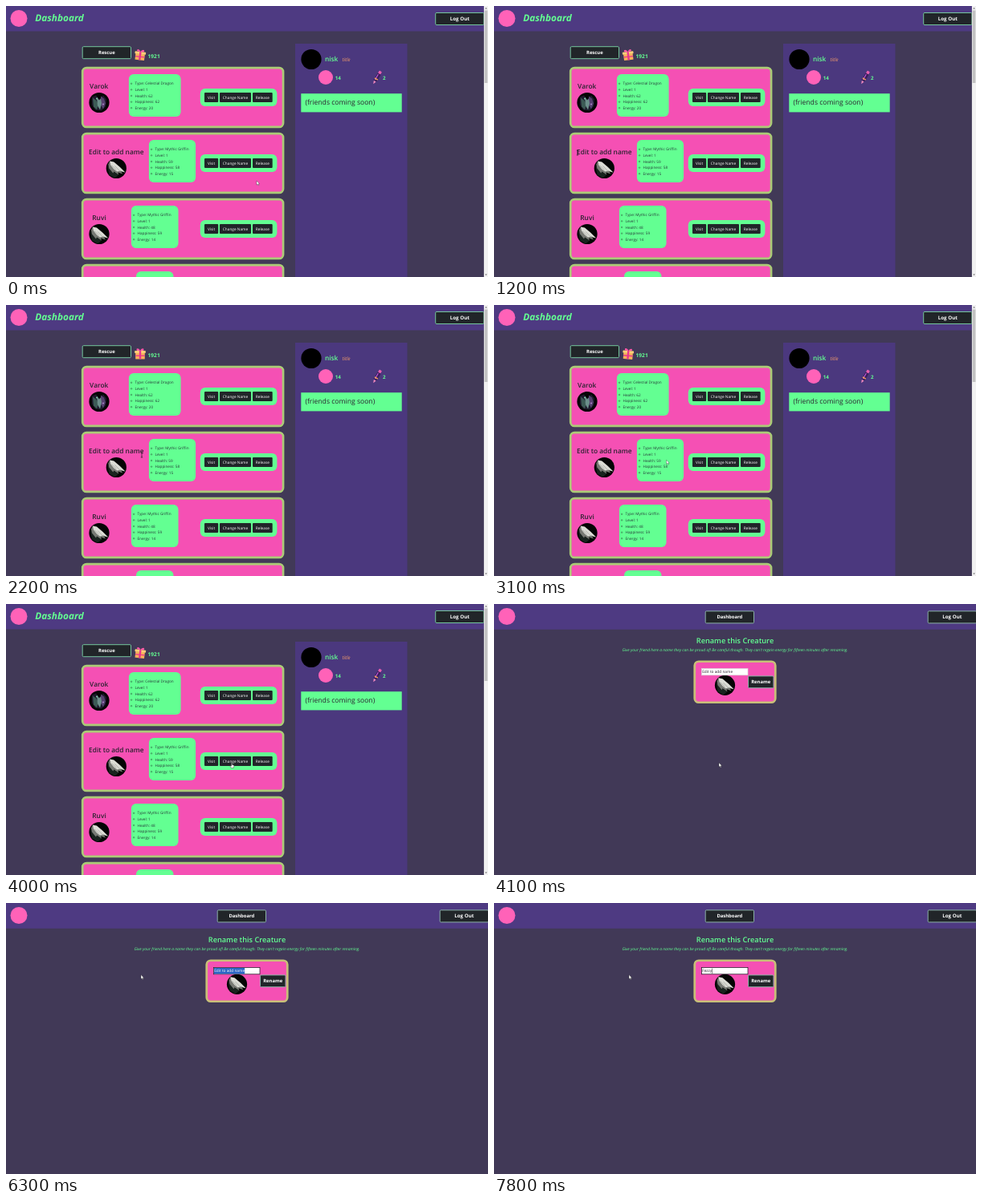
Recreate the animation shown at these times as an HTML page. Size 600 by 338 pixels, loop 8 s.

```html
<!DOCTYPE html>
<html lang="en">
<head>
<meta charset="utf-8">
<title>Creature dashboard</title>
<style>
html, body { margin: 0; width: 100%; height: 100%; overflow: hidden; background: #413957; }
svg { display: block; width: 100vw; height: 100vh; }
text { font-family: "Open Sans", "Noto Sans", sans-serif; text-rendering: geometricPrecision; white-space: pre; }
</style>
</head>
<body>
<svg id="stage" viewBox="0 0 600 338"></svg>
<script>
const LOOP = 8000, SWITCH = 4100;
const GREEN = '#63ff92', PINK = '#f550b4', DARK = '#212529', HEADER = '#4e3a82';
const INK = '#2b2230', LOGO = '#ff62b8', EDGE = '#74c69d', EDGE2 = '#8bb0a6';

const rect = (x, y, w, h, fill, r = 0, more = '') =>
  `<rect x="${x}" y="${y}" width="${w}" height="${h}" rx="${r}" fill="${fill}" ${more}/>`;
const circle = (x, y, r, fill, more = '') =>
  `<circle cx="${x}" cy="${y}" r="${r}" fill="${fill}" ${more}/>`;
const text = (x, y, size, str, fill, more = '') =>
  `<text x="${x}" y="${y}" font-size="${size}" fill="${fill}" ${more}>${str}</text>`;
const path = (d, fill, more = '') => `<path d="${d}" fill="${fill}" ${more}/>`;
const group = (x, y, body, more = '') => `<g transform="translate(${x} ${y})" ${more}>${body}</g>`;
const MID = 'text-anchor="middle"', BOLD = 'font-weight="700"', SEMI = 'font-weight="600"';
const ITALIC = 'font-style="italic"';

const bigButton = (x, y, w, h, label, edge, size = 5.9) =>
  rect(x + .5, y + .5, w - 1, h - 1, DARK, 1.2, `stroke="${edge}"`) +
  text(x + w / 2, y + h / 2 + 2, size, label, '#fff', `${MID} ${BOLD}`);

const smallButton = (x, y, w, label) =>
  rect(x, y, w, 12, DARK, 1) + text(x + w / 2, y + 7.7, 4.75, label, '#fff', MID);

const frame = (x, y, w, h, edge) =>
  rect(x + 1.25, y + 1.25, w - 2.5, h - 2.5, PINK, 5, `stroke="${edge}" stroke-width="2.7"`);

function avatar(x, y, kind) {
  const dragon =
    path('M-9-7L-4-9L0-4L5-9L9-4L8 5L3 10L-5 9L-9 3Z', '#1d1a2c') +
    path('M-8-6L-4-3L-1 2L-3 9L-7 5Z', '#3c5b55') + path('M2-8L6-5L8 1L5 8L2 3Z', '#55406f') +
    path('M-3-7L0-3L2-5L3 1L1 9L-2 4Z', '#6b8f8a') + circle(-3, -5, .9, '#8fe0b8') + circle(5, 2, 1, '#b38ad0');
  const griffin =
    path('M-11-4L-5 3L3 8L-2 12L-9 8Z', '#18231e') +
    path('M-8-9L-2-6L5-1L11 5L6 4L8 7L2 5L3 8L-3 4L-4 6L-9 0L-10-5Z', '#777a74') +
    path('M-8-9L-3-8L4-2L11 5L5 3L1 4L-3 1L-7-4Z', '#dcddd6') +
    path('M-6-4L0 2M-2-3L4 3', 'none', 'stroke="#8d918a" stroke-width=".6"');
  return group(x, y, circle(0, 0, 12.6, '#050505') + (kind === 'dragon' ? dragon : griffin));
}

function card(y, name, nameX, kind, avatarX, boxX, boxW, stats) {
  const lines = stats.map((s, i) =>
    circle(boxX + 3.2, 20.8 + i * 7.6, .8, 'none', 'stroke="#2b5a3e" stroke-width=".5"') +
    text(boxX + 7.6, 22.4 + i * 7.6, 4.68, s, '#27383a')).join('');
  return group(0, y,
    frame(94, -.2, 252.3, 76.4, '#abcb76') +
    text(nameX, 27.2, 8.35, name, INK, `${MID} ${SEMI}`) +
    avatar(avatarX, 44.5, kind) +
    rect(boxX, 9, boxW, 53, GREEN, 6) + lines +
    rect(241.8, 27, 95.6, 22, GREEN, 6) +
    smallButton(247, 32, 17.2, 'Visit') +
    smallButton(266, 32, 39, 'Change Name') +
    smallButton(307, 32, 24.7, 'Release'));
}

const statList = (type, health, joy, energy) =>
  ['Type: ' + type, 'Level: 1', 'Health: ' + health, 'Happiness: ' + joy, 'Energy: ' + energy];

const gift =
  rect(-5.8, -1.5, 11.6, 8, '#f7b05a', .6) + rect(-6.8, -4, 13.6, 3, '#ffcf78', .6) +
  rect(-1.2, -4, 2.4, 10.4, '#e8368f') + rect(-5.8, 1.6, 11.6, 1.3, '#e8368f') +
  path('M0-4C-2-8-6-7-4-4ZM0-4C2-8 6-7 4-4Z', '#ff5aa8');

const pen = `<g transform="rotate(30)">` +
  rect(-2.2, -5.5, 4.4, 11, '#3b1f5c', 1.2) + rect(-1.8, -8.8, 3.6, 3.6, '#e85fb0', .7) +
  rect(-1.3, -4, 1.1, 8, '#c95be0', .4) + rect(-2.2, 1.6, 4.4, 1.4, '#f7a35a') +
  path('M-1.6 5.5H1.6L0 9.5Z', '#f58bc0') + '</g>';

const dashboard =
  rect(0, 0, 600, 31.5, HEADER) + circle(16, 15.5, 10.5, LOGO) +
  text(36.3, 18.9, 11.8, 'Dashboard', GREEN, `${BOLD} ${ITALIC}`) +
  bigButton(534.2, 8, 61.3, 16, 'Log Out', EDGE, 6.2) +
  bigButton(94.7, 50.2, 61.3, 16, 'Rescue', EDGE) +
  group(167, 61, `<g id="gift">${gift}</g>`) +
  text(176.6, 65.3, 6.6, '1921', GREEN, BOLD) +
  card(76, 'Varok', 115.7, 'dragon', 116, 152.9, 64.7, statList('Celestial Dragon', 62, 62, 20)) +
  card(158, 'Edit to add name', 137.3, 'griffin', 137.3, 177.9, 58.2, statList('Mythic Griffin', 59, 58, 15)) +
  card(240, 'Ruvi', 116, 'griffin', 116, 155.9, 58.6, statList('Mythic Griffin', 48, 59, 14)) +
  frame(94, 321.8, 252.3, 76.4, '#abcb76') + rect(162, 331, 46.5, 53, GREEN, 6) +
  rect(360, 47, 139.5, 300, '#4b387e') + circle(380, 66.5, 12.6, '#000') +
  text(397, 69.3, 8.3, 'nisk', GREEN, SEMI) +
  text(418.4, 69, 6.2, 'title', '#f29a6b', ITALIC) +
  circle(398, 89, 9, LOGO) + text(409.8, 91.6, 6.2, '14', GREEN, BOLD) +
  group(462, 89, pen) + text(469, 91.6, 6.2, '2', GREEN, BOLD) +
  rect(367.3, 109.2, 125.4, 23.2, GREEN) + text(372.4, 123.2, 8.6, '(friends coming soon)', INK) +
  rect(594.9, 0, 5.1, 338, '#f1f1f1') + rect(595.7, 5.5, 3.7, 90.5, '#c1c1c1') +
  path('M596.4 3.6L597.6 2L598.8 3.6ZM596.4 334.4L597.6 336L598.8 334.4Z', '#555');

const renamePage =
  rect(0, 0, 600, 31.8, HEADER) + circle(16, 15.5, 10.5, LOGO) +
  bigButton(262.7, 8.4, 61.3, 16, 'Dashboard', EDGE2) +
  bigButton(539.7, 8.4, 61.3, 16, 'Log Out', EDGE2, 6.2) +
  text(300, 49.2, 9.2, 'Rename this Creature', GREEN, `${MID} ${SEMI}`) +
  text(300, 59.4, 4.94, "Give your friend here a name they can be proud of! Be careful though. They can't regain energy for fifteen minutes after renaming.", GREEN, `${MID} ${ITALIC} font-weight="500"`) +
  frame(248.5, 70.5, 103, 53.5, '#c8c078') +
  avatar(287.5, 101.3, 'griffin') +
  bigButton(316, 89.4, 32.5, 15.8, 'Rename', EDGE2) +
  rect(258.5, 80.5, 57.5, 8.3, '#fff', 0, 'id="field" stroke-width=".7"') +
  text(259.2, 86.4, 4.77, '', INK, 'id="value"') +
  rect(259, 81, 0, 7.4, '#2b66c6', 0, 'id="mark"') +
  `<clipPath id="clip">${rect(259, 80, 0, 9, '#000', 0, 'id="clipBox"')}</clipPath>` +
  text(259.2, 86.4, 4.77, 'Edit to add name', '#fff', 'id="marked" clip-path="url(#clip)"') +
  rect(0, 81.6, .5, 6.4, '#111', 0, 'id="caret"');

const pointers = {
  arrow: path('M0 0V5.2L1.2 4.1L2 5.9L2.9 5.5L2.1 3.8H3.7Z', '#fff', 'stroke="#222" stroke-width=".35"'),
  beam: path('M-1.2-3H1.2M0-3V3M-1.2 3H1.2', 'none', 'stroke="#1c1320" stroke-width=".7"'),
  hand: path('M-.5 0Q0-.7.5 0V2L2.4 2.4Q3 2.7 2.8 3.6L2.3 6H-.6L-2 3.7Q-1.8 2.9-.5 3.7Z', '#fff', 'stroke="#222" stroke-width=".4"')
};

const stage = document.getElementById('stage');
stage.innerHTML = rect(0, 0, 600, 338, '#413957') +
  `<g id="dash">${dashboard}</g><g id="rename">${renamePage}</g><g id="pointer">` +
  Object.entries(pointers).map(([k, v]) => `<g id="${k}">${v}</g>`).join('') + '</g>';
const el = id => document.getElementById(id);
const set = (id, name, value) => el(id).setAttribute(name, value);
const show = (id, on) => set(id, 'visibility', on ? 'inherit' : 'hidden');

// time, x, y of the pointer
const route = [
  [0, 312, 218], [900, 112, 186], [1200, 104, 183], [1500, 166, 186], [1800, 101, 185],
  [2200, 169, 187], [2500, 106, 186], [2750, 164, 187], [3600, 301, 204], [3900, 282, 199],
  [4100, 280, 198], [4200, 280, 198], [4400, 278, 198.5], [4500, 278, 198.5],
  [5100, 297, 85], [5350, 297, 85], [6000, 168, 89.6], [LOOP, 168, 89.6]
];

function pointerAt(t) {
  const i = Math.max(1, route.findIndex(p => p[0] >= t));
  const [t0, x0, y0] = route[i - 1], [t1, x1, y1] = route[i];
  const u = (t - t0) / (t1 - t0), s = u * u * (3 - 2 * u);
  return [x0 + (x1 - x0) * s, y0 + (y1 - y0) * s];
}

function pointerKind(x, y, onDash) {
  if (!onDash) return x > 258 && x < 316 && y > 80 && y < 89 ? 'beam' : 'arrow';
  if (y > 190 && y < 202 && x > 266 && x < 305) return 'hand';
  return x > 102 && x < 172 && y > 177 && y < 189 ? 'beam' : 'arrow';
}

const NAME = 'Fezzy';
const keyTimes = [6800, 7000, 7100, 7300, 7400];

function draw(ms) {
  const t = Math.floor(ms % LOOP / 100 + 1e-6) * 100;
  const onDash = t < SWITCH;
  show('dash', onDash);
  show('rename', !onDash);

  const [x, y] = pointerAt(t), kind = pointerKind(x, y, onDash);
  set('pointer', 'transform', `translate(${x.toFixed(2)} ${y.toFixed(2)})`);
  Object.keys(pointers).forEach(k => show(k, k === kind));
  set('gift', 'transform', `rotate(${(7 * Math.cos(t * Math.PI / 400)).toFixed(2)})`);

  const typed = keyTimes.filter(k => t >= k).length;
  const value = el('value');
  value.textContent = typed ? NAME.slice(0, typed) : 'Edit to add name';
  const focused = t >= 5200;
  set('field', 'stroke', focused ? '#15151d' : '#d8d8d8');

  const end = 259.2 + value.getComputedTextLength();
  const from = focused && !typed ? Math.min(end, Math.max(259, x)) : end;
  for (const id of ['mark', 'clipBox']) {
    set(id, 'x', from);
    set(id, 'width', Math.max(0, end - from));
  }
  show('marked', from < end);
  set('caret', 'x', end + .2);
  show('caret', !onDash && focused && from >= end && t !== 7600 && t !== 7700);
}

function tick(now) {
  draw(now);
  requestAnimationFrame(tick);
}
draw(0);
requestAnimationFrame(tick);
</script>
</body>
</html>
```
